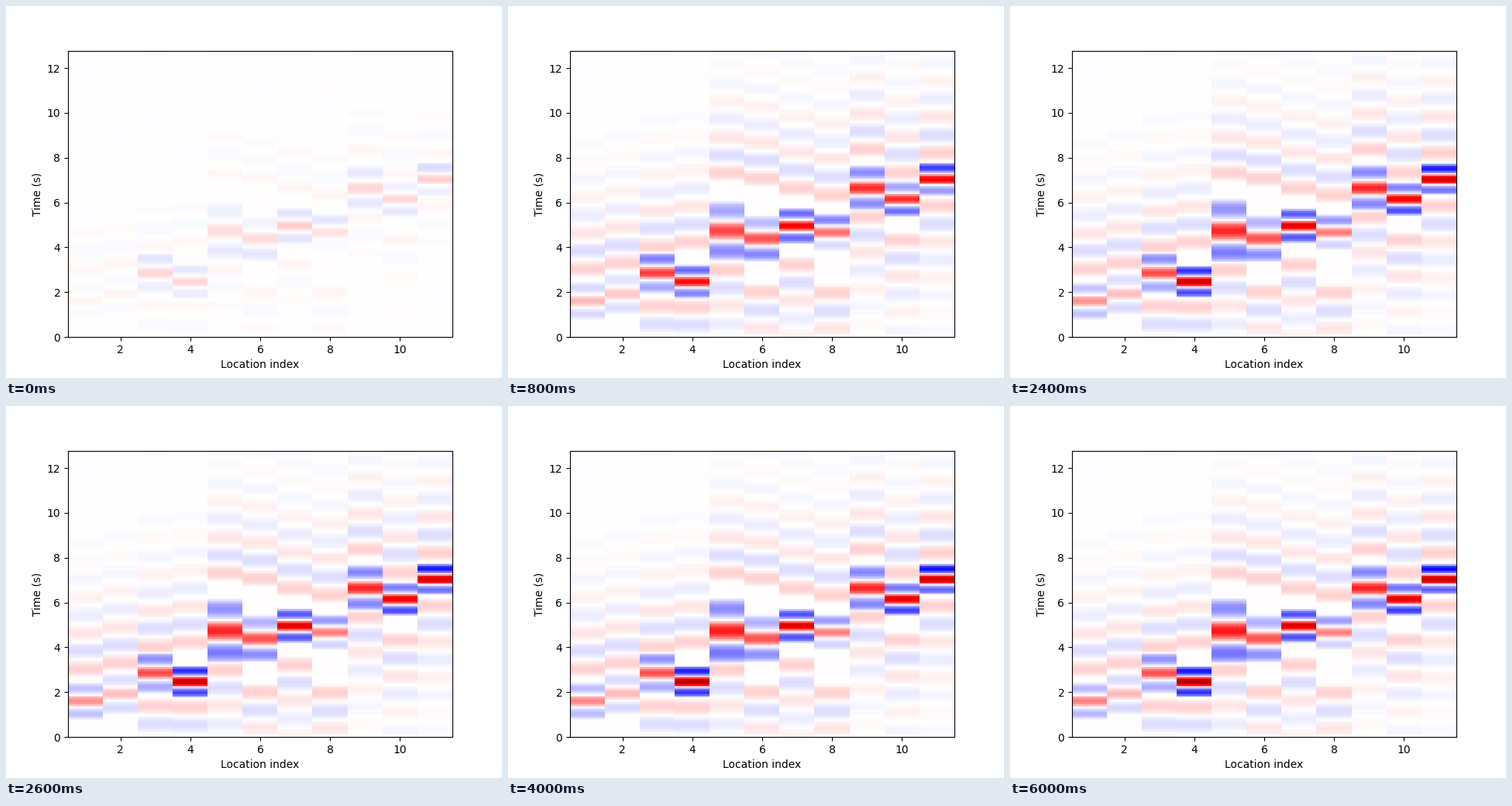
Recreate the animation shown at these times as a matplotlib script. Size 640 by 480 pixels, loop 6200 ms.

```python
import numpy as np
import matplotlib.pyplot as plt
from matplotlib.animation import FuncAnimation

FRAMES, INTERVAL = 31, 200
N_TIME, N_LOC, T_MAX = 256, 11, 12.775
SETTLE = 7.5         # steps over which the traces converge
MEAN_PERIOD = 0.65   # every wavelet starts closer to this spacing
SIDE = 0.55          # side lobe height relative to the peak
RIPPLE, SPACING, FADE = 0.18, 0.8, 2.6

# Per location: arrival, peak-to-trough time, first and final height,
# skew of the side lobes, gap to the ripples before and after.
ARRIVALS = [
    (1.60, .56, .20, .50, .0, 3.0, 1.45),
    (1.92, .62, .20, .27, .1, 3.0, 1.40),
    (2.85, .62, .80, .68, -.2, 1.5, 1.20),
    (2.46, .47, .78, 1.6, -.1, 1.15, 1.78),
    (4.72, 1.0, .67, .92, .15, 1.75, 2.60),
    (4.38, .72, .68, .68, .3, 2.4, 2.70),
    (4.95, .51, 1.0, 1.28, .0, 1.75, 1.70),
    (4.65, .53, .60, .50, -.6, 2.7, 1.70),
    (6.63, .71, .82, .87, .0, 1.3, 1.75),
    (6.14, .50, .72, 1.22, .25, 1.85, 1.20),
    (7.02, .46, .95, 1.46, -.35, 1.2, 1.20),
]
arrival, period, first, final, skew, lead, tail = np.array(ARRIVALS).T
times = (np.arange(N_TIME) + 0.5) * T_MAX / N_TIME
lag = times[:, None] - arrival


def wavelet(spacing, height, tilt):
    """Cosine peak with one weaker trough on either side."""
    x = lag / spacing
    side = SIDE * (1 - np.sign(x) * tilt)
    weight = np.where(abs(x) < 0.5, 1, side)
    return np.where(abs(x) < 1.5, height * weight * np.cos(np.pi * x), 0)


def ripples(gap, direction):
    """Fading oscillation that sets in a given gap from the peak."""
    x = direction * lag - gap
    wave = RIPPLE * np.exp(-x / FADE) * np.cos(np.pi * x / SPACING)
    return np.where(x > -SPACING / 2, wave, 0)


background = ripples(lead, -1) + ripples(tail, 1)


def section(step):
    if step == 0:
        return 0.2 * section(1)
    w = np.exp(-(step - 1) / SETTLE)
    spacing = period + 0.35 * w * (MEAN_PERIOD - period)
    height = final + w * (first - final)
    return wavelet(spacing, height, skew * (0.6 + 0.4 * w)) + background


fig, ax = plt.subplots(figsize=(6.4, 4.8), dpi=100)
# The slightly narrower extent gives every location a whole 45 pixels.
image = ax.imshow(section(0), cmap="seismic", vmin=-2, vmax=2,
                  origin="lower", aspect="auto", interpolation="nearest",
                  extent=(0.5, N_LOC + 0.48, 0, T_MAX))
ax.set_xlim(0.5, N_LOC + 0.5)
ax.set_xlabel("Location index")
ax.set_ylabel("Time (s)")


def update(frame):
    # The first step is held for two ticks.
    image.set_data(section(max(frame - 1, 0)))
    return [image]


anim = FuncAnimation(fig, update, frames=FRAMES, interval=INTERVAL,
                     repeat=True, repeat_delay=0)
plt.show()
```
